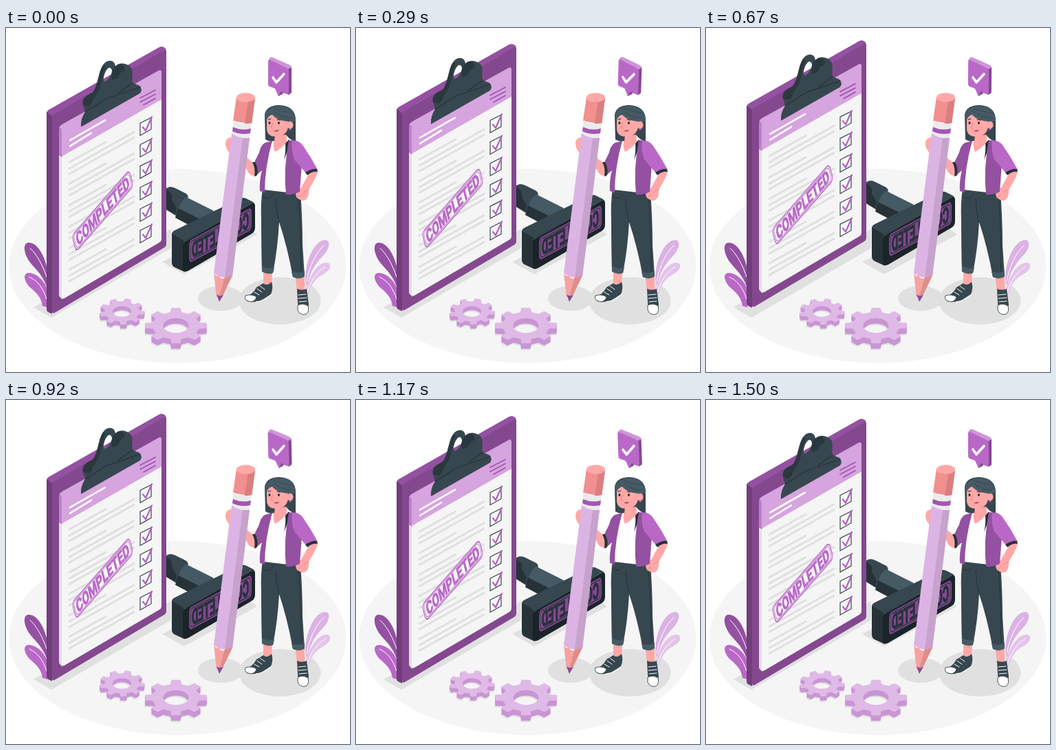
An HTML page for the animation above (1.54 s loop, 500x500 px).

```html
<!DOCTYPE html>
<html lang="en">
<head>
<meta charset="utf-8">
<title>Completed checklist</title>
<style>
html, body { margin: 0; width: 100%; height: 100%; overflow: hidden; background: #fff; }
svg { display: block; width: 100%; height: 100%; }
.float { animation: float 1540ms -20ms linear infinite; }
.wind { transform-origin: 398px 70px; animation: wind 1540ms -20ms linear infinite; }
@keyframes float {
  0%, 97%, 100% { transform: translateY(0); }
  48% { transform: translateY(-10px); }
}
@keyframes wind {
  0%, 97%, 100% { transform: rotate(0); }
  25% { transform: rotate(2.5deg); }
  73% { transform: rotate(-2.5deg); }
}
.line { fill: none; stroke-linecap: round; stroke-linejoin: round; }
.label { font: 700 29px Roboto, sans-serif; text-anchor: middle; stroke-width: 1.2; }
.ink { fill: #37474f; }
.deep { fill: #263238; }
.skin { fill: #ffa8a7; }
.violet { fill: #9451a1; }
.shadow { fill: #e0e0e0; }
</style>
</head>
<body>
<svg viewBox="0 0 500 500">
  <ellipse cx="249.500" cy="346" rx="245" ry="141" fill="#f5f5f5"/>
  <g class="shadow">
    <path d="M40 406L66 421L240 320V292Z"/>
    <path d="M227 340L259 358L365 300L340 282Z"/>
    <ellipse cx="312" cy="393" rx="33" ry="18"/>
    <ellipse cx="398" cy="396.500" rx="59.500" ry="34.500"/>
  </g>

  <!-- plants -->
  <path class="violet" d="M60 350C55 327 44 311 32 312C23 314 27 331 36 342C44 352 53 358 60 378Z"/>
  <path fill="#ba68c8" d="M60 379C54 364 43 356 32 356C23 358 28 370 35 377C43 384 51 390 53 404L60 406Z"/>
  <path class="line" stroke="#fff" d="M35 320C45 329 54 346 59 362M34 362C46 367 54 378 59 394"/>
  <path fill="#dcb2e4" d="M435 368C434 341 448 308 464 308C473 309 470 322 460 332C448 344 441 358 438 374Z"/>
  <path fill="#e4c4ea" d="M436 388C437 364 452 340 467 341C475 343 471 353 461 358C449 364 443 374 439 388Z"/>
  <path class="line" stroke="#fff" d="M462 316C450 327 441 347 437 368M464 347C452 354 443 367 438 384"/>

  <g id="gears"></g>

  <!-- rubber stamp -->
  <g class="float">
    <path class="ink" d="M226 236L237 231.500Q241 230.500 246 233L262 241Q266 244 264 249L250 275L226 260Z"/>
    <path class="deep" d="M226 240L234 236Q243 240 241 250L248 262L246 271L226 260Z"/>
    <path fill="#455a64" d="M262 246L302 266L286 291L248 276Q250 254 262 246Z"/>
    <path class="deep" d="M250 262L290 282L276 292L246 276Z"/>
    <path class="ink" d="M241 300Q241 296 246 294L340 248Q345 246 349 248L359 253Q362 255 361 259L260 313Z"/>
    <path class="deep" d="M241 299L258 309Q260 312 260 355L245 348Q241 346 241 341Z"/>
    <path fill="#1b2429" d="M257 317Q258 310 264 307L356 256Q362 253 362 259V290Q362 297 356 300L265 353Q257 357 257 349Z"/>
    <path class="line" stroke="#546e7a" stroke-width=".7" d="M259 311L357 255"/>
    <g transform="matrix(-.494 .265 0 1.080 357 261)">
      <rect width="184" height="30" rx="7" fill="#824890"/>
      <rect x="4" y="2.500" width="176" height="25" rx="5" fill="none" stroke="#263238" stroke-width="1.300"/>
      <text class="label deep" x="92" y="25.300" stroke="#263238">COMPLETED</text>
    </g>
  </g>

  <!-- clipboard -->
  <g class="float">
    <path fill="#9451a1" d="M59 125Q59 120 64 118L223 28Q228 26 232 30L233 36L67 132Z"/>
    <path fill="#713d7b" d="M59 122L67 128V416L61 413Q59 412 59 408Z"/>
    <path fill="#84488f" d="M67 131Q67 127 71 125L229 33Q233 30 233 35V314Q233 318 229 320L71 414Q67 416 67 412Z"/>
    <path fill="#e0e0e0" d="M77 185L82 188V395L79 392Q77 391 77 387Z"/>
    <path fill="#f5f5f5" d="M81 186L226 102V307Q226 310 223 312L85 393Q81 395 81 391Z"/>
    <path fill="#c080cd" d="M77 147L82 144V188L77 185Z"/>
    <path fill="#d6a4de" d="M77 146Q78 142 82 140L222 62Q226 60 226 65V104L81 187V148Q80 145 77 146Z"/>
    <path class="line" stroke="#fff" stroke-width="2.600" d="M93 163.500L144 134.500M93 172L124 153"/>
    <path class="line" stroke="#a355b2" stroke-width="1.800" d="M195 102L217 90.500M195 108L217 96.500M200 112L217 102.500"/>
    <g id="rows"></g>
    <g transform="matrix(.451 -.516 .2 .767 96 302)">
      <rect width="184" height="30" rx="8" fill="#f5f5f5" stroke="#ba68c8" stroke-width="2.200"/>
      <rect x="3.500" y="2.800" width="177" height="24.400" rx="6" fill="none" stroke="#ba68c8" stroke-width="1.300"/>
      <text class="label" x="92" y="25.300" fill="#ba68c8" stroke="#ba68c8">COMPLETED</text>
    </g>
    <path class="ink" fill-rule="evenodd" d="M112 112C110 101 118 98 126 94C134 84 134 64 141 54C147 45 158 46 159 56C165 49 176 52 181 57C186 62 182 72 184 80L194 84Q199 90 195 95L109 144Q108 133 115 122ZM148 59C143 64 140 76 143 78C148 78 154 68 154 62Q152 56 148 59Z"/>
    <path class="deep" d="M126 94C134 84 134 64 141 54L145 56C140 64 140 84 132 96L121 114L112 112C110 101 118 98 126 94Z" opacity=".65"/>
    <path class="deep" d="M157 58C164 49 175 53 172 63C163 63 166 76 154 75Q152 67 157 58Z" opacity=".75"/>
    <path class="line" stroke="#263238" stroke-width="1.200" d="M115 122Q130 114 145 103Q164 97 195 86M184 80L163 95"/>
    <ellipse class="deep" cx="123" cy="108" rx="1.500" ry="2.500"/>
  </g>

  <!-- woman -->
  <path class="skin" d="M326 159Q319 161 319 168Q319 176 327 184L335 181V163Z"/>
  <path class="skin" d="M350 188L361 198L364 214Q357 216 352 210L346 198Z"/>
  <path class="skin" d="M374 354H387L386 375L374 373ZM420 358H434V383L423 382Z"/>
  <path class="ink" d="M386 369Q389 378 385 387L371 396Q361 400 350 397L348 391Q359 387 364 377L374 371Q379 376 386 369ZM423 379Q430 382 437 379L440 402L437 415L426 414L424 399Z"/>
  <path fill="#fff" stroke="#37474f" stroke-width=".9" d="M348 389Q358 386 364 391Q363 396 357 398Q345 397 348 389ZM424 403Q432 399 439 404Q441 413 436 416Q427 418 424 410Z"/>
  <path class="line" stroke="#fff" stroke-width="1" d="M363 398Q376 397 386 387M361 384L368 388M365 379L372 384M369 375L376 380M425 388L436 387M425 393L437 392M426 398L437 397"/>
  <path class="ink" d="M373 234L428 238Q431 280 431 315L434 361Q427 366 417 362Q409 318 397 282Q395 320 388 356Q381 359 372 354Q371 319 371 278Q370 253 373 234Z"/>
  <path fill="#455a64" d="M372 346Q381 351 390 348L388 356Q381 359 372 354ZM415 354Q426 358 434 353V361Q427 366 417 362Z"/>
  <path class="line" stroke="#263238" stroke-width="1" d="M397 282Q393 267 392 248M425 243Q429 294 429 354M373 245Q382 252 389 241"/>

  <path class="skin" d="M443 207L453 208Q453 214 440 235Q441 248 433 251Q422 250 421 242Q422 236 429 232Z"/>
  <path class="line" stroke="#e8827f" stroke-width=".9" d="M440 235Q436 235 432 240M425 245L429 242"/>
  <path fill="#fff" d="M383 165L414 163L409 239L374 235Z"/>
  <path class="skin" d="M390 150H408V166Q398 177 391 180Q388 175 389 166Z"/>
  <path class="deep" d="M411 162L406 168Q407 180 404 192L413 169Z"/>
  <path class="violet" d="M387 164L376 167Q370 171 368 181L360 197L365 213L372 207Q368 222 369 237L376 239Q376 203 387 164Z"/>
  <path class="deep" d="M358 195L362 195Q367 203 365 214L361 216Q363 204 358 195Z"/>
  <path class="violet" d="M411 163L423 164L430 198L427 238Q418 243 407 242Q403 206 411 163Z"/>
  <path fill="#ba68c8" d="M416 163Q427 164 431 170Q443 187 453 206L436 211L419 191Q414 178 416 163Z"/>
  <path class="deep" d="M435 210Q445 204 452 205L453 209Q445 208 438 214Z"/>

  <path class="ink" d="M376 126Q378 113 396 112Q421 113 421 134V164Q413 164 407 155L391 157L390 164Q383 166 377 162Z"/>
  <path class="skin" d="M379 129Q382 123 388 124Q397 132 410 134V144Q408 157 393 158Q380 158 379 147Z"/>
  <path fill="#455a64" d="M376 132Q375 117 394 113Q421 113 421 136Q396 137 387 126Q382 127 379 133Z"/>
  <path class="line" stroke="#37474f" stroke-width=".8" d="M389 121Q399 130 415 131M390 117Q401 122 417 123"/>
  <ellipse class="skin" cx="413" cy="141" rx="4.500" ry="5.500"/>
  <circle cx="413" cy="147" r="1.500" fill="#ba68c8"/>
  <g class="deep">
    <ellipse cx="383" cy="138" rx="1.500" ry="2"/>
    <ellipse cx="396.500" cy="138" rx="1.500" ry="2"/>
  </g>
  <path class="line" stroke="#263238" stroke-width="1.200" d="M381 133L385 132M394 133L399 134"/>
  <path class="line" stroke="#e8827f" stroke-width="1" d="M388 138L385 145L388 146"/>
  <path fill="#a84c5d" d="M389 149L397 148Q394 153 389 149Z"/>

  <!-- pencil -->
  <path fill="#f28f8f" d="M335 100L362 102L357 140L330 135Z"/>
  <path fill="#d97f7f" d="M352 106L362 102L357 140L347 139Z"/>
  <ellipse cx="348.500" cy="101" rx="13.500" ry="6.800" fill="#ffa8a7"/>
  <path fill="#ebebeb" d="M331 134Q343 142 357 138L354 160Q339 160 328 154Z"/>
  <path fill="#a355b2" d="M330 144Q343 150 356 146L355 153Q341 156 329 150Z"/>
  <path fill="#dcb4e4" d="M328 153Q338 161 354 160L329 361Q313 366 302 356Z"/>
  <path fill="#c6a2cd" d="M344 160L354 160L329 361L318 363Z"/>
  <path fill="#f6a3a1" d="M302 356Q305 362 309 360Q314 367 318 363L329 360L314 391H306Z"/>
  <path fill="#de8d8b" d="M318 363L329 360L314 391L310 390Z"/>
  <path fill="#8b4a97" d="M306 387Q310 391 316 388L310 398Z"/>

  <!-- speech bubble -->
  <g class="wind">
    <path fill="#cf95d9" d="M381 49Q381 44 386 42L413 54Q415 55 415 58L411 63Z"/>
    <path fill="#824990" d="M410 60L415 57V94L411 97L403 94L402 96L396 99L393 90Z"/>
    <path fill="#ba68c8" d="M381 49Q381 45 385 47L408 58Q411 60 411 64V94Q411 97 407 95L400 92L396 99L391 88L383 85Q381 84 381 81Z"/>
    <path class="line" stroke="#fff" stroke-width="3.600" d="M388 72L393 79L404 67"/>
  </g>
</svg>
<script>
const byId = id => document.getElementById(id);

const row = i => `<g transform="translate(0 ${i * 31.2})">
  <path fill="none" stroke="#e0e0e0" stroke-width="3" d="M91 196L146 165.500M91 205L187 151M91 213L187 159"/>
  <path fill="none" stroke="#37474f" stroke-width="1.200" d="M195 138.500L211 130.500V147.500L195 156.500Z"/>
  <path class="line" stroke="#b060be" stroke-width="2.200" d="M199 144.500L203 149.500L212 129.500"/>
</g>`;
byId("rows").innerHTML = Array.from({ length: 6 }, (_, i) => row(i)).join("");

// Toothed outline with a round hole, flattened onto the floor.
function gearPath(cx, cy, r, teeth, turn) {
  const step = 2 * Math.PI / teeth;
  const corners = [[-.29, .77], [-.19, 1], [.19, 1], [.29, .77]];
  const pts = [];
  for (let i = 0; i < teeth; i++)
    for (const [a, k] of corners) {
      const t = turn + (i + a) * step;
      pts.push((cx + Math.cos(t) * r * k).toFixed(1) + " " + (cy + Math.sin(t) * r * k * .58).toFixed(1));
    }
  const h = r * .41, v = h * .58;
  return `M${pts.join("L")}ZM${cx - h} ${cy}a${h} ${v} 0 1 0 ${2 * h} 0a${h} ${v} 0 1 0 ${-2 * h} 0Z`;
}

function gear(cx, cy, r, teeth, turn, depth) {
  const d = gearPath(cx, cy, r, teeth, turn);
  const layer = (x, y, fill) =>
    `<path fill="${fill}" fill-rule="evenodd" transform="translate(${x} ${y})" d="${d}"/>`;
  let out = layer(-1, depth + 2, "#e0e0e0");
  for (let y = depth; y > 0; y--) out += layer(0, y, "#c995d4");
  return out + layer(0, 0, "#dfbae6");
}
byId("gears").innerHTML =
  gear(168.5, 412, 33, 9, .1, 6) + gear(247, 432.5, 45, 8, 0, 8);
</script>
</body>
</html>
```
